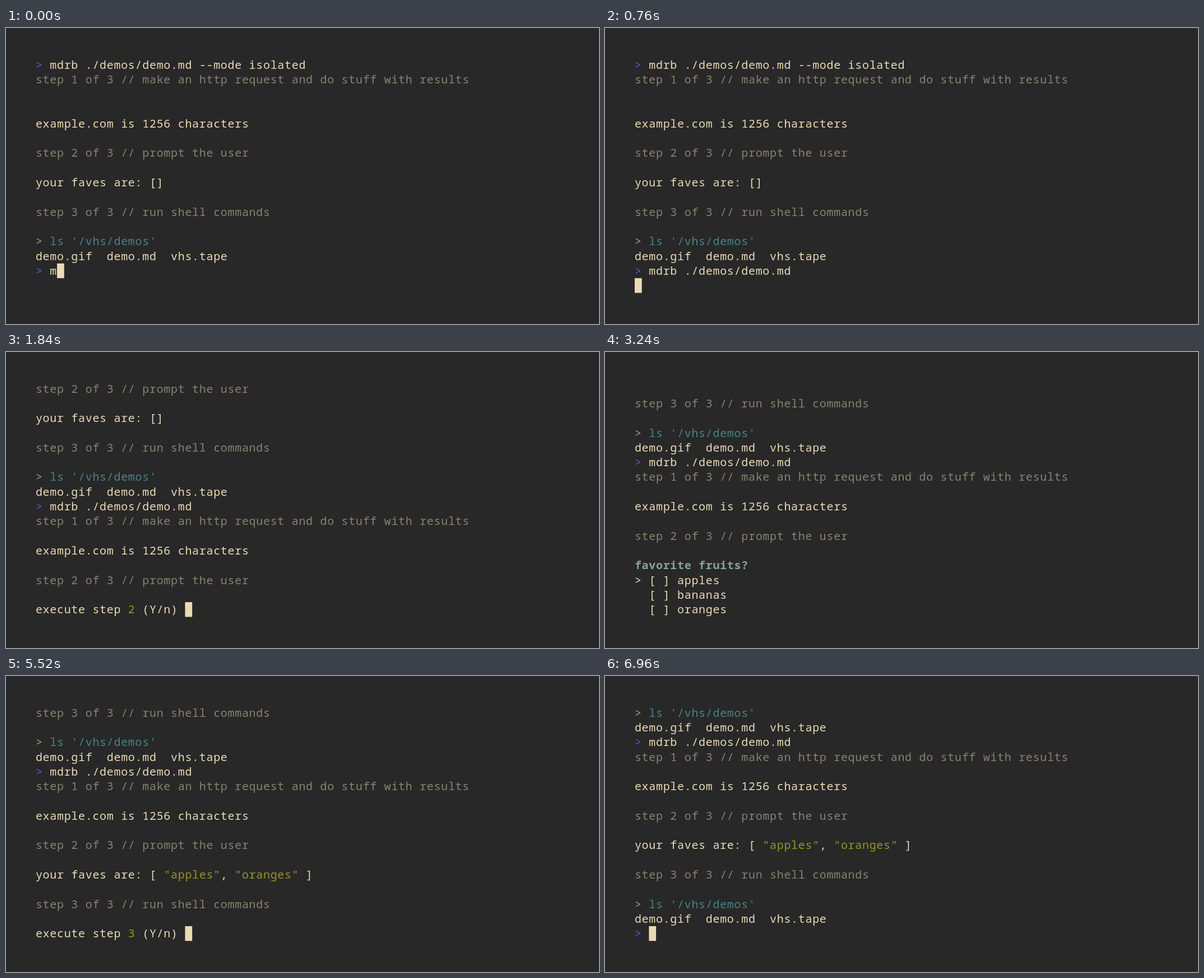
Animation, 1058 px wide and 529 px high, one loop 7.32 s. Source, as an HTML page with a canvas:

```html
<!DOCTYPE html>
<html lang="en">
<head>
<meta charset="utf-8">
<title>Terminal session</title>
<style>
html, body { margin: 0; width: 100%; height: 100%; overflow: hidden; background: #282828; }
canvas { display: block; }
</style>
</head>
<body>
<canvas id="stage" width="1058" height="529"></canvas>
<script>
const ctx = document.getElementById('stage').getContext('2d');
const LOOP = 7320, ROWS = 16;
const LEFT = 53, TOP = 52.6, CELL_W = 12.69, CELL_H = 26.3, BASELINE = 20;
const FONT = '20px "Noto Sans Mono", "DejaVu Sans Mono", monospace';

// Text is marked up with {x}, where x is one of these colours.
const COLORS = {
  f: '#ebdbb2', // foreground
  d: '#8a826d', // dim
  g: '#a89984', // grey
  p: '#5b56e0', // prompt
  t: '#458588', // teal
  o: '#98971a', // olive
  b: '#83a598'  // heading, bold
};

const command = 'mdrb ./demos/demo.md';
const shell = text => '{p}> {f}' + text;
const step = (n, title) => `{d}step ${n} of 3 // ${title}`;
const ask = (n, answer = '') => `execute step {o}${n}{f} (Y/n) ${answer}`;

const request = step(1, 'make an http request and do stuff with results');
const prompt = step(2, 'prompt the user');
const run = step(3, 'run shell commands');
const size = 'example.com is 1256 characters';
const listing = ["{g}> {t}ls '/vhs/demos'", 'demo.gif  demo.md  vhs.tape'];

const before = [
  shell(command + ' --mode isolated'), request, '', '', size, '',
  prompt, '', 'your faves are: []', '', run, '', ...listing
];
const started = [...before, shell(command)];
const fetched = [...started, request, '', size, ''];
const prompted = [...fetched, prompt, ''];
const chosen = [...prompted, 'your faves are: [ {o}"apples"{f}, {o}"oranges"{f} ]', '', run, ''];

const menu = (active, ...checked) => [
  ...prompted, '{b}favorite fruits?',
  ...['apples', 'bananas', 'oranges'].map((fruit, i) =>
    `${i === active ? '>' : ' '} [${checked.includes(i) ? 'x' : ' '}] ${fruit}`)
];

function typing(t) {
  const frame = Math.floor(t / 40);
  return [...before, shell(command.slice(0, 1 + Math.round(frame * 19 / 18)))];
}

// [start in ms, lines, cursor hidden]
const scenes = [
  [760, [...started, '']],
  [920, [...started, request, '', ask(1)]],
  [1360, [...started, request, '', ask(1, 'y')]],
  [1720, [...started, request, '', '']],
  [1800, [...fetched]],
  [1840, [...prompted, ask(2)]],
  [2880, [...prompted, ask(2, 'y')]],
  [3160, [...prompted, '']],
  [3240, menu(0), true],
  [4200, menu(0, 0), true],
  [4480, menu(1, 0), true],
  [4800, menu(2, 0), true],
  [5160, menu(2, 0, 2), true],
  [5480, [...prompted, '', '', '', ''], true],
  [5520, [...chosen, ask(3)]],
  [6080, [...chosen, ask(3, 'y')]],
  [6400, [...chosen, '']],
  [6920, [...chosen, ...listing, '']],
  [6960, [...chosen, ...listing, shell('')]]
];

// Draws one line and returns the column after its last character.
function drawLine(line, row) {
  let col = 0, key = 'f';
  line.split(/\{(\w)\}/).forEach((part, i) => {
    if (i % 2) { key = part; return; }
    ctx.fillStyle = COLORS[key];
    ctx.font = (key === 'b' ? 'bold ' : '') + FONT;
    for (const ch of part) {
      ctx.fillText(ch, LEFT + col * CELL_W + 5.9, TOP + row * CELL_H + BASELINE);
      col++;
    }
  });
  return col;
}

function draw(t) {
  const scene = scenes.findLast(s => s[0] <= t) || [0, typing(t)];
  const [, lines, hidden] = scene;
  const view = lines.slice(-ROWS);
  ctx.fillStyle = '#282828';
  ctx.fillRect(0, 0, 1058, 529);
  ctx.textAlign = 'center';
  let col = 0;
  view.forEach((line, row) => { col = drawLine(line, row); });
  if (hidden) return;
  ctx.fillStyle = COLORS.f;
  ctx.fillRect(LEFT + col * CELL_W, TOP + (view.length - 1) * CELL_H, CELL_W, CELL_H);
}

const start = performance.now();
function tick() {
  draw((performance.now() - start) % LOOP);
  requestAnimationFrame(tick);
}
tick();
</script>
</body>
</html>
```
